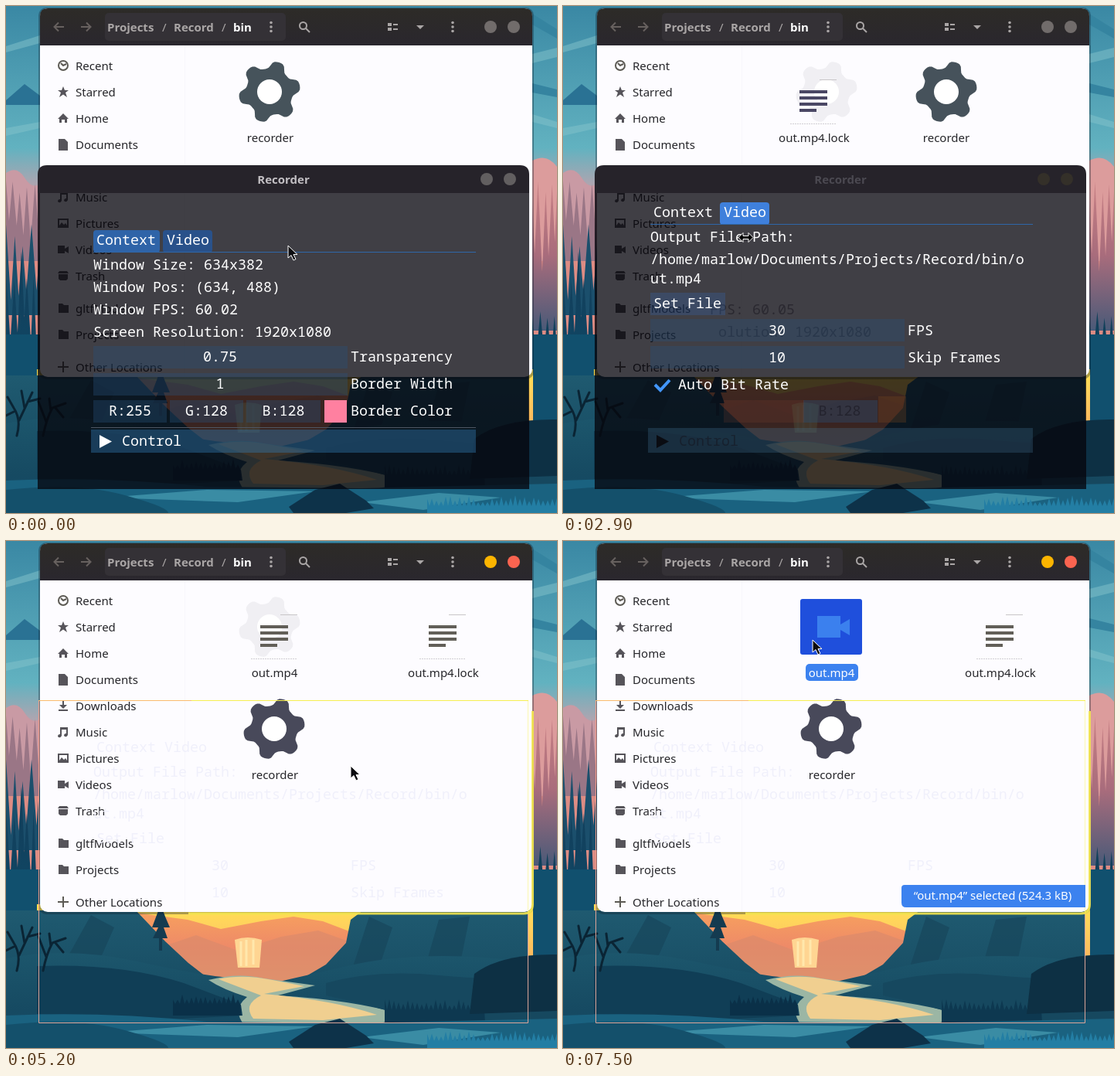
Write an HTML page that moves like this. It is 713 by 656 pixels and loops after 8 s.

```html
<!DOCTYPE html>
<html lang="en">
<head>
<meta charset="utf-8">
<title>Screen recorder</title>
<style>
html, body { margin: 0; width: 100%; height: 100%; overflow: hidden; background: #0c3550; }
svg { display: block; width: 100vw; height: 100vh; }
text { white-space: pre; }
.ui { font: 15px "Noto Sans", sans-serif; fill: #26262a; }
.b { font-weight: 700; }
.mid { text-anchor: middle; }
.mono { font: 18.33px "Noto Sans Mono", monospace; fill: #fff; }
.ghost { fill: #15131c; opacity: .5; }
.pale { fill: #f0f0fb; }
</style>
</head>
<body>
<svg id="stage" viewBox="0 0 713 656" preserveAspectRatio="none"></svg>
<script>
const LOOP = 8000, STEP = 100;
const stage = document.getElementById('stage');

const rect = (x, y, w, h, fill, r = 0, more = '') =>
  `<rect x="${x}" y="${y}" width="${w}" height="${h}" rx="${r}" fill="${fill}" ${more}/>`;
const path = (d, fill, more = '') => `<path d="${d}" fill="${fill}" ${more}/>`;
const line = (d, color, w = 1, more = '') =>
  path(d, 'none', `stroke="${color}" stroke-width="${w}" ${more}`);
const disc = (x, y, r, fill, more = '') =>
  `<circle cx="${x}" cy="${y}" r="${r}" fill="${fill}" ${more}/>`;
const text = (x, y, s, cls, fill) =>
  `<text x="${x}" y="${y}" class="${cls}"${fill ? ` style="fill:${fill}"` : ''}>${s}</text>`;
const group = (id, body, more = '') => `<g id="${id}" ${more}>${body}</g>`;
const gradient = (id, ...stops) => `<linearGradient id="${id}" x1="0" y1="0" x2="0" y2="1">` +
  stops.map(([at, c]) => `<stop offset="${at}" stop-color="${c}"/>`).join('') + '</linearGradient>';

let seed = 11;
const rnd = () => (seed = (seed * 16807) % 2147483647) / 2147483647;

function trees(x0, x1, y, h, base, fill) {
  let d = '';
  for (let x = x0; x < x1; x += 7 + rnd() * 5) {
    const top = y + rnd() * h, w = 6 + rnd() * 4;
    d += `M${x} ${top}L${x + w} ${base}H${x - w}Z`;
  }
  return path(d, fill);
}

function bush(x0, x1, y, base, fill) {
  let d = `M${x0} ${base}`;
  for (let x = x0; x <= x1; x += 6) d += `L${x} ${y - rnd() * 9}L${x + 3} ${y + 5}`;
  return path(d + `L${x1} ${base}Z`, fill);
}

function wallpaper() {
  return rect(0, 0, 713, 656, 'url(#sky)') +
    path('M0 52L44 38V48L0 60ZM0 158L44 150V158L0 168ZM681 62L713 54V66L681 74ZM681 140L713 150V158L681 150Z', '#84c4cc', 'opacity=".5"') +
    path('M0 122L24 101L44 116V128H0Z', '#2a7294') +
    path('M681 10L713 30V42L681 24ZM681 100L713 108V118L681 112Z', '#3584a0') +
    path('M0 216Q14 206 24 222T44 230V320H0Z', '#c99aa4') +
    path('M681 200Q700 190 713 208V330H681Z', '#dc9c9c') +
    trees(0, 46, 226, 30, 330, '#9a7686') +
    trees(681, 716, 218, 40, 420, 'url(#farTrees)') +
    trees(0, 46, 282, 30, 400, '#1b4f6c') + trees(0, 46, 305, 50, 500, 'url(#nearTrees)') +
    trees(681, 716, 385, 20, 500, '#11405a') +
    path('M0 425H44V656H0ZM681 425H713V656H681Z', '#11506e') +
    rect(40, 470, 642, 120, 'url(#dusk)') +
    path('M160 480L235 490L278 502L330 492L372 486L410 492L452 508V570H200Z', 'url(#ridge)') +
    path('M205 524L246 510L300 530L356 512L404 504L460 524V570H205Z', '#dc8b6c', 'opacity=".7"') +
    path('M296 516Q312 510 331 516L328 552H300Z', '#ffd592') +
    line('M304 518V550M311 516V550M320 516V548', '#ffe8ac', 3) +
    path('M0 478H168L206 518L236 546L272 574H0Z', 'url(#cliff)') +
    path('M676 478H462L446 490L440 520L414 548L380 568L400 576H676Z', 'url(#cliff)') +
    path('M470 486L500 500L480 560H446ZM560 490L600 486L585 560H540ZM110 484L140 500L120 545H76Z', '#17465c', 'opacity=".7"') +
    path('M0 540Q80 524 170 544T300 566L345 572L450 548Q560 525 713 550V656H0Z', 'url(#bank)') +
    path('M262 568Q300 558 334 566L400 575L352 588Q450 594 510 612Q512 620 470 626L308 626Q292 606 312 590Q280 580 262 568Z', '#9bb6a4') +
    path('M275 567Q305 560 345 568L386 576L334 586Q424 594 480 613L410 620L320 618Q306 600 330 588Z', '#f0cf90') +
    path('M40 550Q150 546 230 572L304 600L306 614L190 620L40 612Z', '#103e56') +
    bush(216, 304, 594, 614, '#0a3048') +
    path('M414 572Q480 554 560 562T713 560V622L540 622Q480 602 414 588Z', '#16485f') +
    bush(490, 620, 602, 624, '#0d3850') +
    path('M606 560Q640 534 713 535V608L600 612Z', '#0d3044') +
    path('M0 614Q120 608 260 622L460 624L713 618V656H0Z', '#1a6280') +
    path('M130 636L260 626L400 628L300 642ZM460 642L560 630L640 636L540 652Z', '#3a8ca4') +
    path('M0 626Q90 616 150 632T210 656H0Z', '#14506b') +
    path('M366 648L400 626L432 618L466 640L476 650L440 656H372Z', '#0d3249') +
    bush(545, 713, 642, 656, '#237ea4') +
    path('M200 470L206 486L212 500H204L209 514H202V530H198V514H190L197 500H189L195 484Z', '#143b50') +
    line('M14 556Q20 535 10 520L2 506M17 536L34 500M24 520L20 498M28 512L44 508M48 556Q52 535 60 520L77 514M52 538L42 512M58 524L56 508M64 520L74 532M12 524L0 530', '#0a2434', 3, 'stroke-linecap="round"');
}

function gear(cx, cy, fill, hole = '#fff') {
  let d = '';
  for (let a = 0; a < 360; a += 4) {
    const r = 35 + 5.2 * Math.tanh(1.8 * Math.cos((a + 12) * Math.PI / 30));
    const q = a * Math.PI / 180;
    d += `${a ? 'L' : 'M'}${(cx + r * Math.cos(q)).toFixed(1)} ${(cy + r * Math.sin(q)).toFixed(1)}`;
  }
  return path(d + 'Z', fill) + disc(cx, cy, 16, hole);
}

const label = (x, y, s, fill) => text(x, y, s, 'ui mid', fill);
const page = (x, fill) => [36, 36, 36, 22].map((w, i) => rect(x, 109 + i * 8, w, 4, fill)).join('') +
  line(`M${x + 26} 95.5H${x + 48}`, '#c8c6c8') +
  line(`M${x - 12} 152.5H${x + 48}`, '#d0ced2', 1, 'stroke-dasharray="2 1"');

const places = [
  ['Recent', 77, 'M80 77A6 6 0 1 1 68 77A6 6 0 1 1 80 77M71 74L74 77L78 75', 1],
  ['Starred', 111, 'M74 104L76 109H81L77 112L79 118L74 114.500L69 118L71 112L67 109H72Z'],
  ['Home', 145, 'M67 146L74 139L81 146H79V151H76V147H72V151H69V146Z'],
  ['Documents', 179, 'M68 172H76L80 176V187H68Z'],
  ['Downloads', 213, 'M73 206H75V212H79L74 217L69 212H73ZM68 218H80V220H68Z'],
  ['Music', 247, 'M70 241H80V251Q78 255 75 252Q75 249 78 249V244H72V252Q70 256 67 253Q67 250 70 250Z'],
  ['Pictures', 281, 'M67 275H81V287H67ZM69 277V284L72 280L75 283L77 281L79 284V277Z'],
  ['Videos', 315, 'M67 310H76V314L81 311V320L76 317V320H67Z'],
  ['Trash', 349, 'M69 343H79L81 346H67ZM68 347H80V353L78 355H70L68 353Z'],
  ['gltfModels', 391, 'M68 385H73L75 387H81V397H68Z'],
  ['Projects', 425, 'M68 419H73L75 421H81V431H68Z'],
  ['Other Locations', 467, 'M67 467H81M74 460V474', 1]
];

const dots = x => [21.5, 27, 32.5].map(y => disc(x, y, 1.8, '#aaa6a6')).join('');

function fileWindow() {
  const head = '#aaa6a6';
  return rect(42, 2, 641, 481, '#102030', 10, 'opacity=".35"') +
    rect(44, 3, 637, 477, '#fdfcff', 10) +
    path('M44 51V13Q44 3 54 3H671Q681 3 681 13V51Z', 'url(#bar)') +
    rect(128, 9, 234, 36, '#343136', 5) +
    line('M231.5 51V480', '#f8f7fb') +
    line('M75 27H63M68 21.500L62.500 27L68 32.500M97 27H109M104 21.500L109.500 27L104 32.500', '#67615f', 2) +
    text(131, 33, 'Projects', 'ui b', head) + text(202, 33, '/', 'ui', head) +
    text(217, 33, 'Record', 'ui b', head) + text(279, 33, '/', 'ui', head) +
    text(294, 33, 'bin', 'ui b', '#fff') + dots(343) + dots(578) +
    disc(384.5, 25.5, 4.5, 'none', `stroke="${head}" stroke-width="2"`) + line('M388 29L393 34', head, 2) +
    rect(494, 22, 5, 4, head) + rect(494, 28, 5, 4, head) + rect(501, 23, 6, 2, head) + rect(501, 29, 6, 2, head) +
    path('M531 25H541L536 30Z', head) +
    disc(627, 27, 8, '#716c6b', 'id="fileMin"') + disc(657, 27, 8, '#716c6b', 'id="fileClose"') +
    places.map(([s, y, d, open]) => text(90, y + 6, s, 'ui') +
      (open ? line(d, '#5c5a54', 2) : path(d, '#56545a', 'fill-rule="evenodd"'))).join('');
}

function files() {
  const video = (bg, fg) => rect(307, 75, 80, 72, bg, 3) + rect(329, 97, 30, 28, fg) +
    path('M359 108L371 101V122L359 115Z', fg);
  return group('gearGhost', gear(341, 111, '#f0eff3')) +
    group('filesA', gear(341, 111, '#46535b') + label(342, 176, 'recorder')) +
    group('filesB', page(306, '#4a4764') + label(325, 176, 'out.mp4.lock') +
      gear(496, 111, '#46525b') + label(496, 176, 'recorder')) +
    group('filesC', page(547, '#625f58') + label(566, 176, 'out.mp4.lock') +
      gear(347, 243, '#48495a') + label(348, 308, 'recorder')) +
    group('plainIcon', page(329, '#625f58') + label(347.5, 176, 'out.mp4')) +
    group('videoIcon', video('#3d3846', '#77767b') + label(347.5, 176, 'out.mp4')) +
    group('picked', video('#1f4fdc', '#3b80ee') + rect(314, 159, 68, 22, '#3c82ef', 5) +
      label(347.5, 176, 'out.mp4', '#fff'));
}

const status = () => group('status',
  path('M438 449Q438 445 442 445H676V474H444Q438 474 438 468Z', '#3c82ef') +
  label(556, 464, '“out.mp4” selected (524.3 kB)', '#fff'));

const mono = (x, y, s, more = '') => text(x, y, s, 'mono ' + more);
const field = (x, y, w) => rect(x, y, w, 29, 'rgba(41,80,122,.36)');

function contextTab() {
  const pick = [['R:255', 113, 95], ['G:128', 212, 95], ['B:128', 311, 96]];
  return mono(113, 341, 'Window Size: 634x382') + mono(113, 370, 'Window Pos: (634, 488)') +
    '<text x="113" y="399" class="mono" id="fps"></text>' +
    mono(113, 428, 'Screen Resolution: 1920x1080') +
    field(113, 440, 329) + mono(277, 460, '0.75', 'mid') + mono(446, 460, 'Transparency') +
    field(113, 475, 329) + mono(277, 495, '1', 'mid') + mono(446, 495, 'Border Width') +
    pick.map(([s, x, w]) => field(x, 510, w) + mono(x + w / 2, 530, s, 'mid')).join('') +
    rect(412, 510, 29, 29, '#ff80a0') + mono(446, 530, 'Border Color') +
    line('M110 545.5H608', '#4f5662') + rect(110, 548, 498, 30, 'rgba(48,120,175,.42)') +
    path('M121 555L137 563.5L121 572Z', '#fff') + mono(150, 569, 'Control');
}

const videoText = cls => mono(113, 341, 'Output File Path:', cls) +
  mono(113, 370, '/home/marlow/Documents/Projects/Record/bin/o', cls) +
  mono(113, 395, 'ut.mp4', cls) + mono(117, 427, 'Set File', cls) +
  mono(277, 462, '30', 'mid ' + cls) + mono(446, 462, 'FPS', cls) +
  mono(277, 497, '10', 'mid ' + cls) + mono(446, 497, 'Skip Frames', cls);

function recorder() {
  const leftover = field(311, 510, 96) + rect(208, 510, 104, 29, 'rgba(140,70,50,.18)') +
    rect(408, 505, 36, 34, 'rgba(120,70,30,.3)') +
    rect(110, 546, 498, 32, 'rgba(70,120,155,.28)') + path('M121 555L137 563.5L121 572Z', '#0a0c12') +
    mono(150, 569, 'Control', 'ghost') + mono(358, 530, 'B:128', 'mid ghost') +
    mono(201, 428, 'olution: 1920x1080', 'ghost') + mono(190, 399, 'FPS: 60.05', 'ghost');
  return group('recorder',
    path('M41 242V218Q41 206 53 206H665Q677 206 677 218V242Z', '#26232a') +
    rect(41, 242, 636, 383, 'rgba(6,4,11,.76)') +
    text(359, 230, 'Recorder', 'ui b mid').replace('<text', '<text id="title"') +
    disc(622, 224, 8, '', 'id="recMin"') + disc(652, 224, 8, '', 'id="recClose"') +
    group('leftover', leftover) +
    group('panel',
      rect(113, 290, 86, 29, '#2f64a8', 4, 'id="tabA"') + rect(203, 290, 64, 29, '#29518a', 4, 'id="tabB"') +
      line('M113 318.5H608', '#2f67a8') + mono(117, 309, 'Context') + mono(208, 309, 'Video') +
      group('context', contextTab()) +
      group('video', rect(113, 407, 97, 29, 'rgba(50,110,190,.25)') +
        field(113, 441, 329) + field(113, 476, 329) + videoText('') +
        line('M119 526L126 533L138 520', '#4296fa', 4) + mono(149, 532, 'Auto Bit Rate'))));
}

function overlay() {
  return group('frame',
    group('paleText', mono(117, 309, 'Context Video', 'pale') + videoText('pale'), 'transform="translate(0 -36)"') +
    line('M42.5 480V623.5H675.5V480', '#dca498') + line('M42.5 206V480', '#f09a88') +
    line('M675.5 480V206', '#fbf8b0') +
    line('M42 206.5H676', '#f7ef50') + line('M42 206.5H240', '#ff9c80', 1, 'opacity=".6"') +
    line('M236 482H670Q681.5 482 681.5 470V220', '#f6e850', 3, 'opacity=".9"'));
}

function cursors() {
  const arrow = path('M0 0V16L4 12.5L7 19L10 17.500L7 11.500H12Z', '#0c0c10', 'stroke="#fff"');
  return group('arrow', arrow) +
    group('resize', path('M-9 0L-3 -6V-2H4V-6L10 0L4 6V2H-3V6Z', '#000', 'stroke="#fff"'), 'transform="translate(236 299.5)"') +
    group('busy', path('M0 0V9L11 7Z', '#15151a') + disc(7, 8, 5, '#fff', 'stroke="#25242c" stroke-width="3"') +
      disc(7.5, 8, 2, '#25242c'), 'transform="translate(446 291)"');
}

const defs = '<defs>' +
  gradient('sky', [0, '#3a88a4'], [.28, '#62b2c0'], [.37, '#c0a2ac'], [.5, '#dd8c84']) +
  gradient('dusk', [0, '#ffe24e'], [.2, '#ffd45c'], [1, '#f79a62']) +
  gradient('ridge', [0, '#f7a05e'], [.5, '#ee8a68'], [1, '#e8a070']) +
  gradient('cliff', [0, '#1f5a70'], [1, '#184d64']) +
  gradient('bank', [0, '#1c566c'], [.6, '#164a62'], [1, '#144a66']) +
  gradient('farTrees', [0, '#c88084'], [.5, '#a86c7c'], [1, '#4a5a78']) +
  gradient('nearTrees', [0, '#123c58'], [1, '#104a68']) +
  gradient('bar', [0, '#2d2b27'], [1, '#2a272e']) + '</defs>';

stage.innerHTML = defs + wallpaper() + fileWindow() + files() + recorder() + overlay() + status() + cursors();

const el = {};
stage.querySelectorAll('[id]').forEach(n => el[n.id] = n);
const show = (id, on) => el[id].setAttribute('display', on ? 'inline' : 'none');
const fill = (id, color) => { el[id].style.fill = color; };

const track = [[0, 365, 310], [1000, 235, 297], [3700, 235, 297], [4500, 378, 143],
  [4600, 380, 150], [4900, 446, 291], [6700, 446, 291], [7100, 323, 128], [LOOP, 323, 128]];

function cursorAt(t) {
  const i = track.findIndex(k => k[0] > t);
  const [t0, x0, y0] = track[i - 1], [t1, x1, y1] = track[i];
  const p = (t - t0) / (t1 - t0), e = p * p * (3 - 2 * p);
  return [x0 + (x1 - x0) * e, y0 + (y1 - y0) * e];
}

function render(time) {
  const t = Math.floor(time % LOOP / STEP) * STEP;
  const between = (a, b) => t >= a && t < b;
  const active = between(200, 2800), moved = t >= 2800, onVideo = t >= 1400;
  const refresh = between(6300, 6400), focus = t >= 5200;

  show('recorder', t < 3000);
  show('frame', t >= 3000);
  show('context', !onVideo);
  show('video', onVideo);
  show('leftover', onVideo);
  show('tabA', !moved);
  el.panel.setAttribute('transform', `translate(0 ${moved ? -36 : 0})`);
  el.fps.textContent = 'Window FPS: ' + (t < 1000 ? '60.02' : '60.05');
  fill('tabB', t >= 900 ? '#3f80dc' : '#29518a');
  fill('title', moved ? '#4b4951' : active ? '#fff' : '#c2bfc3');
  fill('recMin', moved ? '#343029' : active ? '#f0c000' : '#625f60');
  fill('recClose', moved ? '#343029' : active ? '#ff6355' : '#625f60');
  fill('fileMin', focus ? '#fcb500' : '#716c6b');
  fill('fileClose', focus ? '#fa6450' : '#716c6b');

  show('gearGhost', between(2900, 6400));
  show('filesA', t < 2900);
  show('filesB', between(2900, 3100));
  show('filesC', t >= 3100 && !refresh);
  show('plainIcon', between(3100, 6300));
  show('videoIcon', between(6400, 7300));
  show('picked', t >= 7300);
  show('status', t >= 7500);

  const resize = between(2800, 3800);
  show('resize', resize);
  show('busy', refresh);
  show('arrow', !resize && !refresh);
  el.arrow.setAttribute('transform', `translate(${cursorAt(t).map(Math.round)})`);
}

const start = performance.now();
(function tick() {
  render(performance.now() - start);
  requestAnimationFrame(tick);
})();
</script>
</body>
</html>
```
